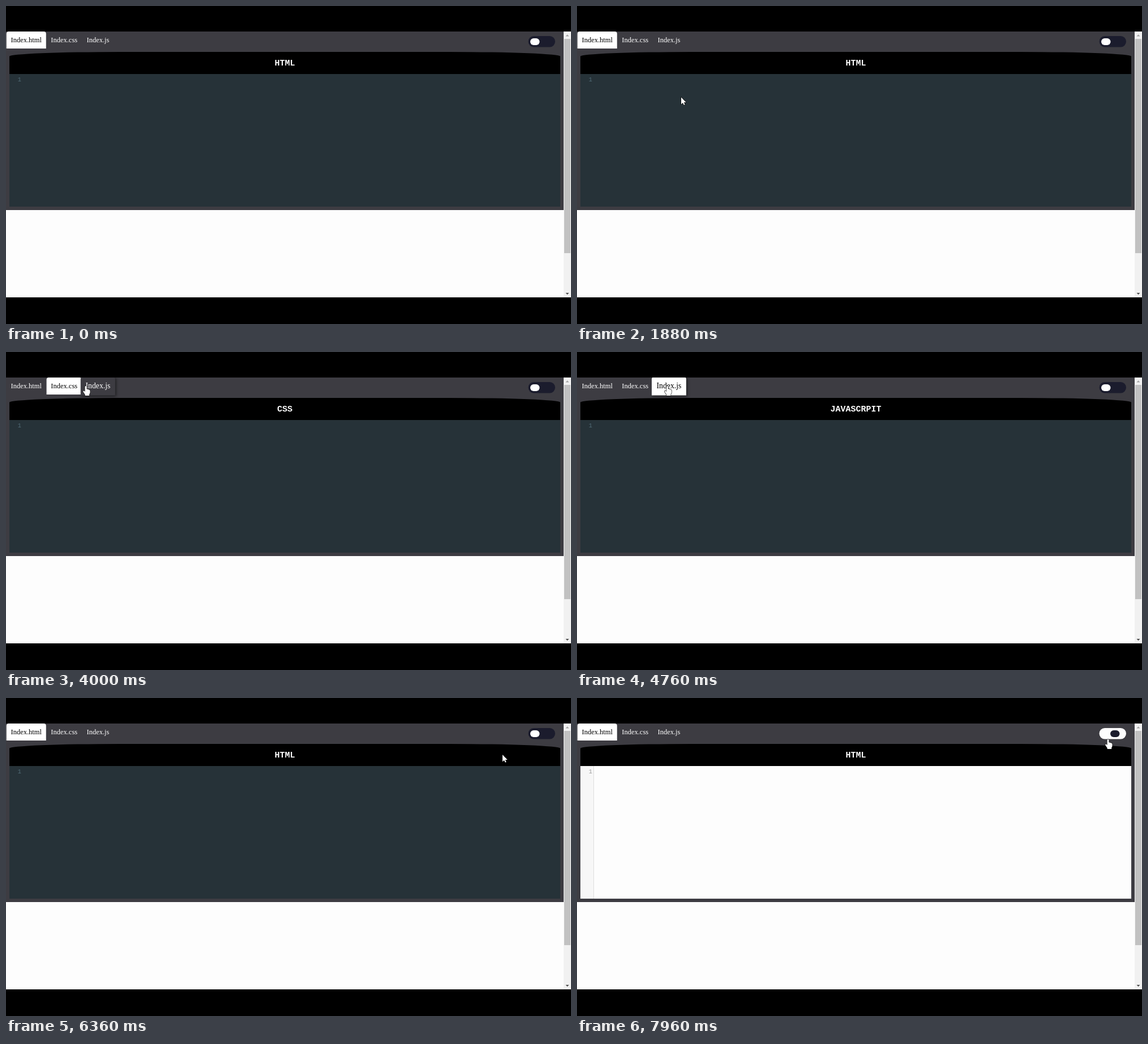
An HTML page with a canvas that plays this animation: 998x561 px, repeating every 8000 ms.

```html
<!DOCTYPE html>
<html lang="en">
<head>
<meta charset="utf-8">
<title>Code editor tabs</title>
<style>
  html, body { margin: 0; width: 100%; height: 100%; overflow: hidden; background: #000; }
  canvas { display: block; width: 998px; height: 561px; }
</style>
</head>
<body>
<canvas id="stage" width="998" height="561"></canvas>
<script>
const ctx = document.getElementById('stage').getContext('2d');
const LOOP = 8000;
const PANEL = '#3d3c42', WHITE = '#fdfdfd', NAVY = [27, 28, 45];
const SERIF = '12.47px "Liberation Serif", "Times New Roman", serif';
const MONO = '"Liberation Mono", "Courier New", monospace';

const TABS = [
  { label: 'Index.html', title: 'HTML' },
  { label: 'Index.css', title: 'CSS' },
  { label: 'Index.js', title: 'JAVASCRPIT' }
];
const PRESSES = [
  { tab: 1, down: 2800, up: 2920 },
  { tab: 2, down: 4360, up: 4480 },
  { tab: 0, down: 5400, up: 5520 }
];
const TOGGLE_TIME = 7120, TOGGLE_LENGTH = 400;

// Pointer stops: time, x, y
const POINTER = [
  [1150, 400, 518], [1800, 184, 161], [2100, 184, 161], [2600, 102, 59],
  [3700, 104, 60], [4000, 141, 60], [4240, 163, 60], [4700, 163, 60],
  [5280, 46, 56], [5640, 46, 56], [6280, 877, 100], [6400, 877, 100],
  [6840, 938, 73], [LOOP, 938, 73]
];

const ease = u => u * u * (3 - 2 * u);
const mix = (a, b, u) => a + (b - a) * u;
const clamp = u => Math.max(0, Math.min(1, u));

function pointerAt(t) {
  const i = POINTER.findIndex(stop => stop[0] > t);
  if (i < 1) return null;
  const [t0, x0, y0] = POINTER[i - 1], [t1, x1, y1] = POINTER[i];
  const u = ease((t - t0) / (t1 - t0));
  return { x: mix(x0, x1, u), y: mix(y0, y1, u) };
}

function rect(x, y, w, h, color) {
  ctx.fillStyle = color;
  ctx.fillRect(x, y, w, h);
}

function roundRect(x, y, w, h, radii, color) {
  ctx.beginPath();
  ctx.roundRect(x, y, w, h, radii);
  ctx.fillStyle = color;
  ctx.fill();
}

function text(str, x, y, font, color, align = 'left', spacing = 0) {
  ctx.font = font;
  ctx.letterSpacing = spacing + 'px';
  ctx.textAlign = align;
  ctx.fillStyle = color;
  ctx.fillText(str, x, y);
  ctx.letterSpacing = '0px';
}

function polygon(points, color) {
  ctx.beginPath();
  points.forEach(([x, y]) => ctx.lineTo(x, y));
  ctx.closePath();
  ctx.fillStyle = color;
  ctx.fill();
}

function drawScrollbar() {
  rect(985, 45, 13, 469, '#f1f1f1');
  rect(986, 58, 11, 378, '#c1c1c1');
  polygon([[988.5, 53.5], [991.5, 50.3], [994.5, 53.5]], '#a3a3a3');
  polygon([[988.5, 506], [991.5, 509.2], [994.5, 506]], '#505050');
}

function drawEditor(title, light) {
  const corner = { x: 195, y: 7.8 };
  roundRect(6, 81, 973, 39, [corner, corner, 0, 0], '#000');
  text(title, 492.5, 104.5, 'bold 15px ' + MONO, '#fff', 'center');
  rect(6, 120, 973, 234, light ? WHITE : '#263238');
  if (light) {
    rect(6, 120, 23, 234, '#f7f7f7');
    rect(29, 120, 1, 234, '#dddddd');
  }
  text('1', 26.8, 132.6, '10.2px ' + MONO, light ? '#999' : '#546e7a', 'right');
}

function layoutTabs(pressed) {
  let x = 0.8;
  ctx.font = SERIF;
  return TABS.map((tab, index) => {
    const spacing = pressed === index ? 1.56 : 0;
    const w = ctx.measureText(tab.label).width + spacing * tab.label.length + 15.6;
    const box = { index, x, w, spacing, label: tab.label };
    x += w + 0.8;
    return box;
  });
}

function drawTab(box, selected, hovered) {
  const fill = selected ? '#fff' : PANEL;
  ctx.save();
  if (hovered) {
    const cx = box.x + box.w / 2;
    ctx.translate(cx, 60);
    ctx.scale(1.1, 1.1);
    ctx.translate(-cx, -60);
    ctx.shadowColor = 'rgba(0, 0, 0, .55)';
    ctx.shadowOffsetX = ctx.shadowOffsetY = 1.5;
    ctx.shadowBlur = 5;
  }
  if (selected || hovered) roundRect(box.x, 45, box.w, 30, [4, 4, 0, 0], fill);
  ctx.shadowColor = 'transparent';
  text(box.label, box.x + 7.8, 64, SERIF, selected ? '#000' : '#fff', 'left', box.spacing);
  ctx.restore();
}

function drawToggle(t) {
  const light = t >= TOGGLE_TIME;
  const u = ease(clamp((t - TOGGLE_TIME) / TOGGLE_LENGTH));
  const knob = `rgb(${NAVY.map(c => mix(255, c, u))})`;
  roundRect(922.5, 53, 47.5, 19.5, 9.75, light ? WHITE : `rgb(${NAVY})`);
  roundRect(mix(926, 942, u), 57, 16.5, 12, 6, knob);
}

const ARROW = new Path2D('M0 0V12.4L2.9 9.8L4.8 13.8L6.7 13L4.9 9.1H8.7Z');
const HAND = new Path2D(
  'M-1.5 1.3Q-1.5 0 0 0T1.5 1.3V5.4Q2.8 4.9 3.5 5.9Q4.8 5.4 5.5 6.5' +
  'Q7.5 6.3 7.5 8.2V11.6Q7.5 13 6.2 14.6V17H-1.3V15.2L-4.6 10.4' +
  'Q-5.3 9-4.2 8.4Q-3.1 8.1-1.5 10Z');

function drawPointer(pointer, shape) {
  ctx.save();
  ctx.translate(pointer.x, pointer.y);
  ctx.strokeStyle = '#000';
  ctx.lineWidth = 1.2;
  ctx.lineJoin = 'round';
  ctx.stroke(shape);
  ctx.fillStyle = '#fff';
  ctx.fill(shape);
  ctx.restore();
}

function draw(t) {
  const pointer = pointerAt(t);
  const press = PRESSES.find(p => t >= p.down && t < p.up);
  const done = PRESSES.filter(p => t >= p.up).pop();
  const selected = done ? done.tab : 0;
  const boxes = layoutTabs(press ? press.tab : -1);
  const hovered = pointer && boxes.find(b =>
    pointer.y < 75 && pointer.x >= b.x && pointer.x < b.x + b.w);
  const onToggle = pointer && pointer.x > 920 && pointer.x < 972 && pointer.y < 77;

  rect(0, 0, 998, 561, '#000');
  ctx.save();
  ctx.beginPath();
  ctx.rect(0, 45, 998, 469);
  ctx.clip();
  rect(0, 45, 985, 469, WHITE);
  rect(0, 45, 985, 315, PANEL);
  drawEditor(TABS[selected].title, t >= TOGGLE_TIME);
  boxes.filter(b => b !== hovered).forEach(b => drawTab(b, b.index === selected, false));
  if (hovered) drawTab(hovered, hovered.index === selected, true);
  drawToggle(t);
  drawScrollbar();
  if (pointer) drawPointer(pointer, hovered || onToggle ? HAND : ARROW);
  ctx.restore();
}

const start = performance.now();
function tick() {
  draw((performance.now() - start) % LOOP);
  requestAnimationFrame(tick);
}
tick();
</script>
</body>
</html>
```
